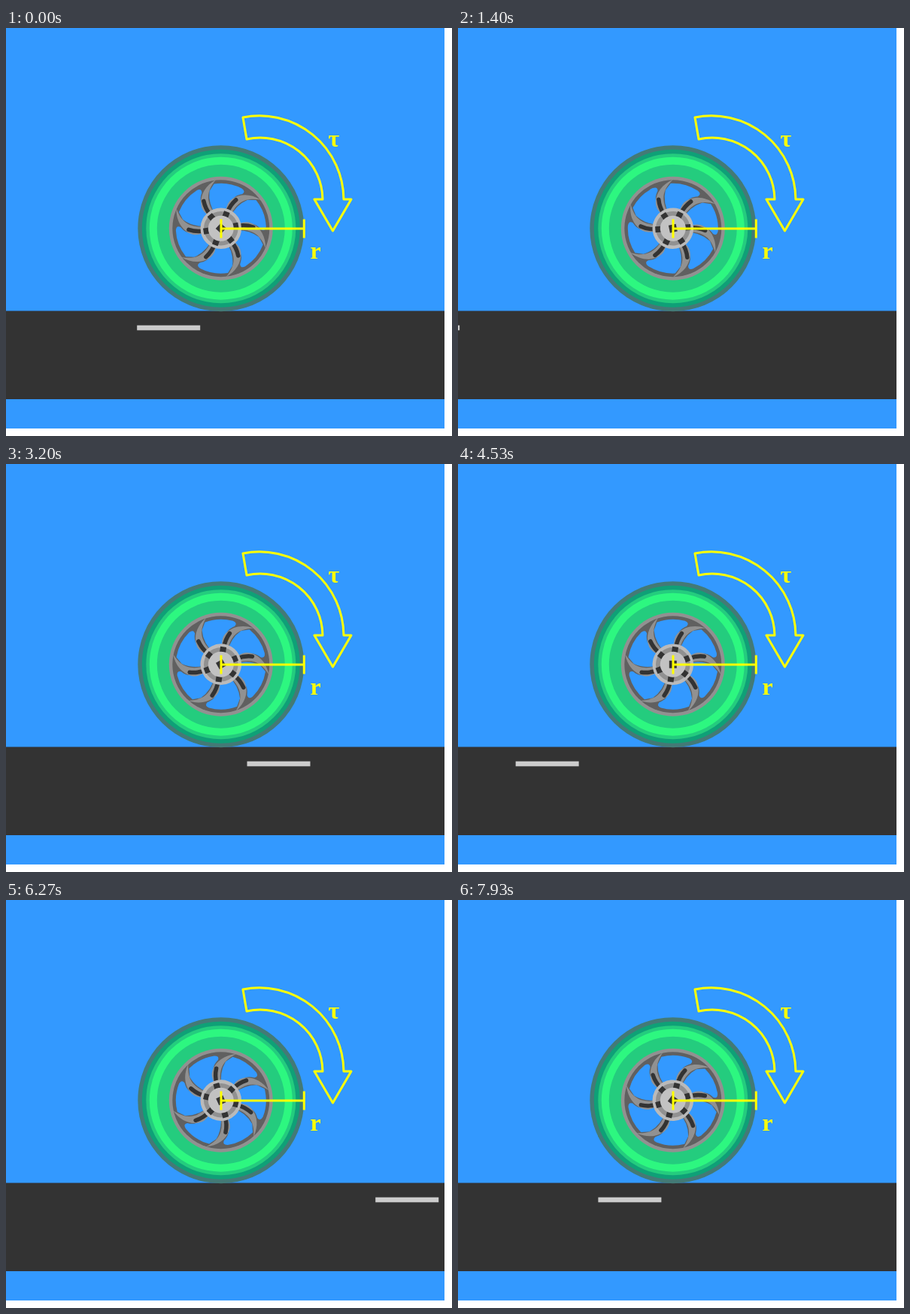
Recreate the animation shown at these times as an HTML page. Size 593x543 px, loop 8000 ms.

```html
<!DOCTYPE html>
<html lang="en">
<head>
<meta charset="utf-8">
<title>Torque on a rolling wheel</title>
<style>
  html, body { margin: 0; width: 100%; height: 100%; overflow: hidden; background: #fff; }
  svg { display: block; }
  .label { font: bold 32px "Liberation Serif", "Times New Roman", serif; fill: #ff0; }
  .mark { fill: none; stroke: #ff0; stroke-width: 3; }
</style>
</head>
<body>
<svg width="583" height="533" viewBox="0 0 583 533" overflow="hidden">
  <defs>
    <path id="window" fill="#39f" d="M-10 -51 L-3 -59.9 A60 60 0 0 1 33 -50.1 Q38.5 -45.5 33 -42.5 C26 -42 21 -40 17 -34 Q12 -27 11 -20 L-4 -16 Q-14 -34 -10 -51Z"/>
    <g id="spoke">
      <path fill="#919191" d="M-14 -18 Q-23.5 -26 -23 -35 C-22.5 -48 -14 -59 0 -65 C-8 -57 -13 -49 -12.5 -39 Q-12 -30 -7 -22Z"/>
      <path fill="none" stroke="#333" stroke-width="5.5" stroke-linecap="round" d="M-12 -19 Q-18 -28 -19 -38.5"/>
    </g>
    <path id="block" stroke="#333" stroke-width="8" transform="rotate(-34)" d="M0 -16 V-23.5"/>
  </defs>

  <rect width="583" height="533" fill="#39f"/>
  <rect y="376.5" width="583" height="117.5" fill="#333"/>
  <rect id="dash" y="395.7" width="84" height="6.6" fill="#ccc"/>

  <g transform="translate(285.8 266.7)">
    <circle r="110.5" fill="#437a76"/>
    <circle r="105" fill="#0fa077"/>
    <circle r="99.5" fill="#24cc7e"/>
    <circle r="95" fill="#2df780"/>
    <circle r="85" fill="#24cc7e"/>
    <circle r="69" fill="#919191"/>
    <circle r="64.5" fill="#606060"/>
    <g id="wheel">
      <g id="spokes"></g>
      <circle r="25" fill="#919191" stroke="#bababa" stroke-width="4.5"/>
      <g id="blocks"></g>
      <circle r="17" fill="#c2c2c2"/>
      <rect x="-5" y="-5" width="10" height="10" fill="#333" transform="rotate(42)"/>
    </g>
  </g>

  <g class="mark">
    <path d="M286 267 H396 M286 254.5 V279.5 M396.3 254.5 V279.5"/>
    <path stroke-linejoin="round" d="M315 119 A112 112 0 0 1 449 228 H459 L434.5 270 L410 228 H421 A83 83 0 0 0 320 148Z"/>
  </g>
  <text class="label" x="428.5" y="158">τ</text>
  <text class="label" x="404.5" y="307">r</text>
</svg>

<script>
  const TIP_ANGLE = -6, SPOKES = 6;
  const STEPS = 60, FPS = 15;
  const DASH_LENGTH = 84, DASH_START = 174.2, DASH_PERIOD = 731.6;
  const wheel = document.getElementById('wheel');
  const dash = document.getElementById('dash');

  function repeatAround(groupId, shapeId) {
    let copies = '';
    for (let i = 0; i < SPOKES; i++) {
      copies += `<use href="#${shapeId}" transform="rotate(${TIP_ANGLE + i * 360 / SPOKES})"/>`;
    }
    document.getElementById(groupId).insertAdjacentHTML('beforeend', copies);
  }
  repeatAround('spokes', 'window');
  repeatAround('spokes', 'spoke');
  repeatAround('blocks', 'block');

  function draw(ms) {
    // Steps start on times rounded to 10 ms, hence the small lead.
    const turn = Math.floor((ms + 5) * FPS / 1000) % STEPS / STEPS;
    const travel = DASH_START + DASH_LENGTH - turn * DASH_PERIOD;
    wheel.setAttribute('transform', `rotate(${turn * 360})`);
    dash.setAttribute('x', (travel + DASH_PERIOD) % DASH_PERIOD - DASH_LENGTH);
  }

  let start;
  function tick(now) {
    start ??= now;
    draw(Math.max(0, now - start));
    requestAnimationFrame(tick);
  }
  draw(0);
  requestAnimationFrame(tick);
</script>
</body>
</html>
```
